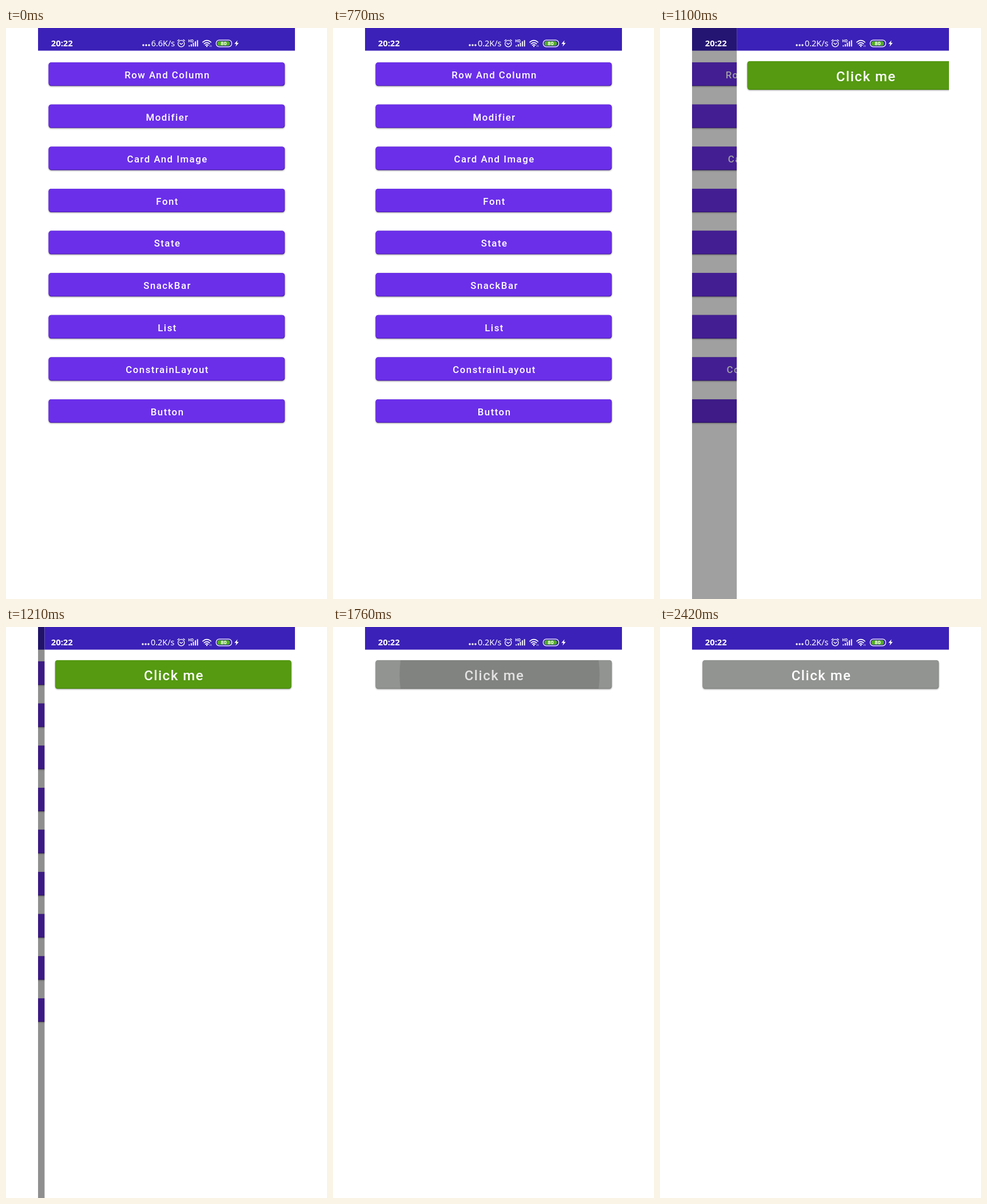
An HTML page with a canvas that plays this animation: 561x998 px, repeating every 2640 ms.

```html
<!DOCTYPE html>
<html lang="en">
<head>
<meta charset="utf-8">
<style>
  html, body { margin: 0; width: 100%; height: 100%; overflow: hidden; background: #fff; }
  canvas { display: block; }
</style>
</head>
<body>
<canvas id="stage" width="561" height="998"></canvas>
<script>
const ctx = document.getElementById('stage').getContext('2d');
const LOOP = 2640, STEP = 110, LAST_STEP = 22;
const PAGE = { x: 56, w: 449, h: 998 };
const BTN = { x: 74.5, w: 412.8 };
const BAR = '#3b21b7';
const LABELS = ['Row And Column', 'Modifier', 'Card And Image', 'Font', 'State',
  'SnackBar', 'List', 'ConstrainLayout', 'Button'];

const clamp = v => Math.min(1, Math.max(0, v));
const lerp = (a, b, k) => a + (b - a) * k;
const easeOut = k => k * k * (3 - 2 * k);

function rect(x, y, w, h, color) {
  ctx.fillStyle = color;
  ctx.fillRect(x, y, w, h);
}

function rounded(x, y, w, h, r, color) {
  ctx.beginPath();
  ctx.roundRect(x, y, w, h, r);
  ctx.fillStyle = color;
  ctx.fill();
}

function dot(x, y, r) {
  ctx.beginPath();
  ctx.arc(x, y, r, 0, 7);
  ctx.fill();
}

function text(str, x, y, font, { align = 'left', spacing = 0, color = '#fff' } = {}) {
  ctx.font = font;
  ctx.textAlign = align;
  ctx.letterSpacing = spacing + 'px';
  ctx.fillStyle = color;
  ctx.fillText(str, x, y);
}

function strokePath(d, width) {
  ctx.strokeStyle = '#fff';
  ctx.lineWidth = width;
  ctx.stroke(new Path2D(d));
}

// Touch feedback: grows from the press point towards the centre, then fades.
function ripple(age, pressX, y, h) {
  if (age <= 0 || age >= 380) return;
  const k = clamp(age / 225);
  const alpha = 0.115 * clamp(age / 75) * (1 - clamp((age - 230) / 150));
  ctx.save();
  ctx.beginPath();
  ctx.roundRect(BTN.x, y, BTN.w, h, 4.5);
  ctx.clip();
  ctx.fillStyle = `rgba(0,0,0,${alpha})`;
  dot(lerp(pressX, 281, k), y + h / 2, lerp(124, 219, easeOut(Math.pow(k, 0.85))));
  ctx.restore();
}

function button(label, y, h, color, edge, fontSize, baseline) {
  ctx.save();
  ctx.shadowColor = 'rgba(0,0,0,.4)';
  ctx.shadowBlur = 2.5;
  ctx.shadowOffsetY = 1;
  rounded(BTN.x, y, BTN.w, h, 4.5, edge);
  ctx.restore();
  rounded(BTN.x, y, BTN.w - 0.7, h - 1.3, 4.5, color);
  text(label, 282.1, baseline, `500 ${fontSize}px Roboto, sans-serif`, { align: 'center', spacing: 1.5 });
}

function page(offset, content) {
  ctx.save();
  ctx.translate(offset, 0);
  rect(PAGE.x, 0, PAGE.w, PAGE.h, '#fff');
  rect(PAGE.x, 0, PAGE.w, 39.6, BAR);
  content();
  ctx.restore();
}

function menu(t) {
  LABELS.forEach((label, i) => {
    const y = 60.2 + 73.6 * i;
    button(label, y, 41, '#6b2fea', '#5421bd', 16.8, y + 27.7);
  });
  ripple(t - 832, 411, 649, 41);
}

function demo(t) {
  const on = t < 1750;
  button('Click me', 58, 50, on ? '#559a11' : '#919490', on ? '#4c8a12' : '#848783', 24, 92.5);
  ripple(t - 1655, 300, 58, 50);
}

function statusBar(t) {
  const busy = t < 770, shift = busy ? 1 : 0;
  text('20:22', 78.7, 32, '600 14.8px "Noto Sans", sans-serif');
  [239, 244, 249].forEach(x => dot(x + shift, 30, 1.7));
  text(busy ? '6.6K/s' : '0.2K/s', 253 + shift * 0.7, 32, '500 14.4px "Noto Sans", sans-serif');

  // Alarm clock
  ctx.lineCap = 'round';
  strokePath('M311.8 27.3a5.6 5.6 0 1 1-11.2 0a5.6 5.6 0 1 1 11.2 0M303.8 26.5l2.4 2.2 2.6-2.2M300 22.2l2.4-1.8M312.4 22.2l-2.4-1.8', 1.3);

  // Mobile signal
  text('HD', 318.3, 24.8, '600 6.5px "Noto Sans", sans-serif');
  for (let i = 0; i < 5; i++) {
    const h = [2, 4, 6.5, 9, 11][i];
    rect(319.3 + i * 3.6, 32.3 - h, 1.9, h, '#fff');
  }

  // Wi-Fi
  strokePath('M343.8 24.8q7.2-6.2 14.4 0M346.2 27.6q4.8-4 9.6 0M348.6 30.2q2.4-2 4.8 0', 1.6);
  dot(351, 32, 1.2);
  rect(356.2, 30, 0.8, 3, '#d5cdf2');
  rect(358.4, 30, 0.8, 3, '#d5cdf2');

  // Battery
  ctx.beginPath();
  ctx.roundRect(367.3, 21.2, 27.2, 11.6, 5.4);
  ctx.lineWidth = 1.2;
  ctx.stroke();
  rounded(369.4, 23.1, 21.8, 7.8, 3.5, '#52ad25');
  text('80', 380.4, 30.4, '600 9px "Noto Sans", sans-serif', { align: 'center' });

  ctx.fillStyle = '#fff';
  ctx.fill(new Path2D('M404.6 21.4l-5.4 6.4h3.3l-1.2 4.8 5.4-6.6h-3.2z'));
}

function draw(t) {
  rect(0, 0, 561, 998, '#fff');
  ctx.save();
  ctx.beginPath();
  ctx.rect(PAGE.x, 0, PAGE.w, PAGE.h);
  ctx.clip();

  const remaining = t < 1000 ? 1 : t >= 1430 ? 0 : Math.exp((1000 - t) / 57.2);
  if (remaining > 0) {
    page(-PAGE.w / 4 * (1 - remaining), () => menu(t));
    rect(PAGE.x, 0, PAGE.w, PAGE.h, `rgba(0,0,0,${0.45 * (1 - remaining)})`);
  }
  if (remaining < 1) page(PAGE.w * remaining, () => demo(t));
  ctx.fillStyle = '#fff';
  statusBar(t);
  ctx.restore();
}

const start = performance.now();
function tick() {
  const elapsed = (performance.now() - start) % LOOP;
  draw(Math.min(Math.floor(elapsed / STEP), LAST_STEP) * STEP);
  requestAnimationFrame(tick);
}
tick();
</script>
</body>
</html>
```
